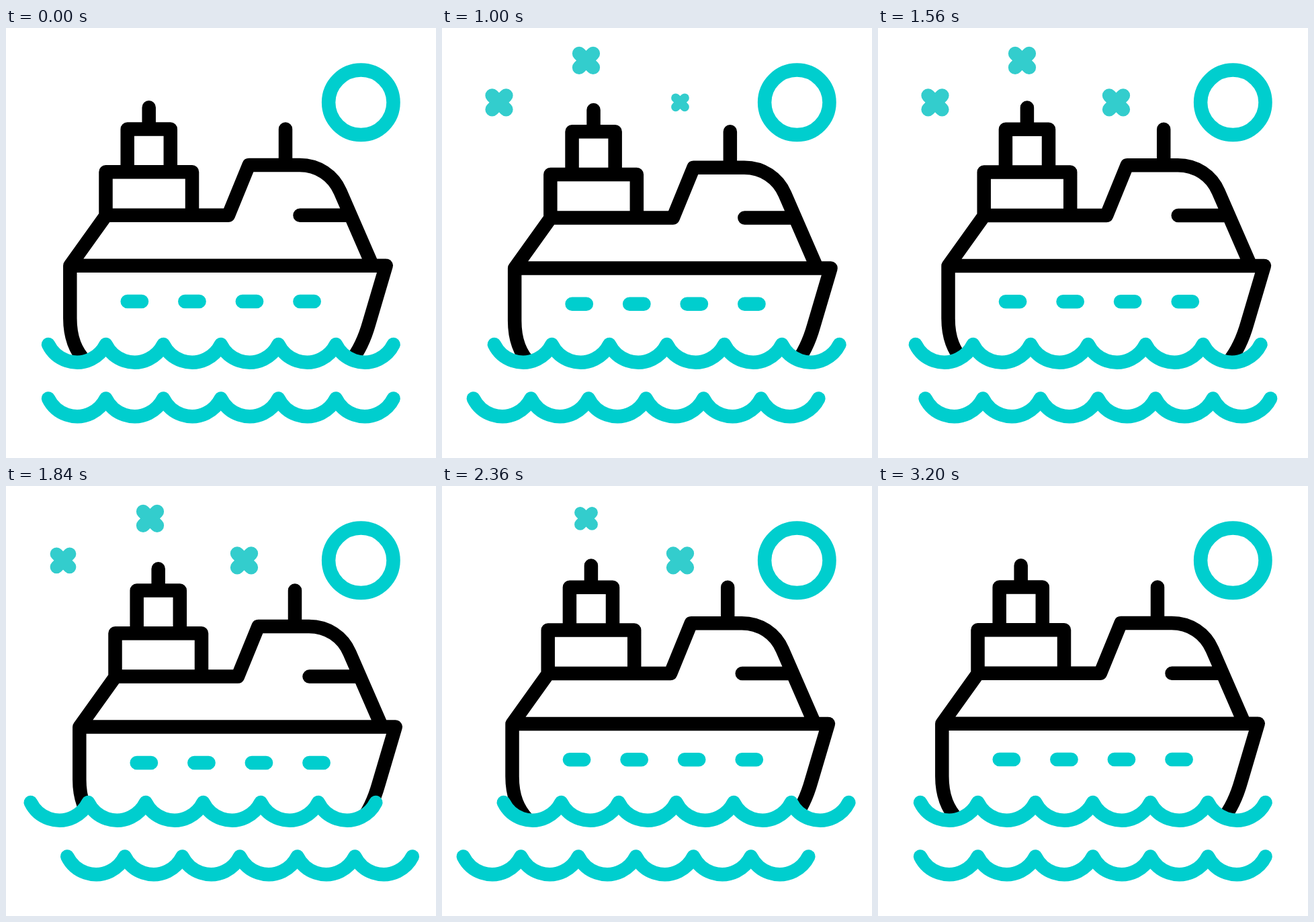
These frames come from a looping animation (640x640 px, 3.44 s). An HTML page with a canvas:

```html
<!DOCTYPE html>
<html lang="en">
<head>
<meta charset="utf-8">
<title>Ship at sea</title>
<style>
html, body { margin: 0; width: 100%; height: 100%; overflow: hidden; background: #fff; }
canvas { display: block; width: 640px; height: 640px; }
</style>
</head>
<body>
<canvas id="stage" width="640" height="640"></canvas>
<script>
const ctx = document.getElementById('stage').getContext('2d');
const LOOP = 3440, END = 3200, STEP = 40;
const TEAL = '#00cece', PALE = '#33cdcd', BLACK = '#000', LINE = 20.5;

// Keys are [time, value, ...]; each span eases in and out.
const WAVE_TOP = [[0, 0], [600, -27], [1200, 29.5], [1800, -27], [2400, 29.5], [3080, 0]];
const WAVE_LOW = [[0, 0], [600, 29], [1200, -32], [1800, 29], [2400, -32], [3080, 0]];
const SHIP = [[0, 0, 0], [400, 16.7, 6.9], [800, 9, 0], [1200, 16.7, 7.6], [1600, 9, 0],
  [2000, 16.7, 7.6], [2400, 9, 0], [2800, 16.7, 7.6], [3200, 0, 0]];
const STARS = [
  { x: 85, y: 110.8, show: 0, hide: 1780 },
  { x: 214.5, y: 48.4, show: 480, hide: 2260 },
  { x: 354.5, y: 110.8, show: 760, hide: 2580 }
];

const SHIP_LINES = new Path2D(
  'M95.3 353.7H565.7' +
  'M95.3 353.7V432C95.3 462 104 481 118 496' +
  'M565.7 353.7L540.5 439C534 462 526 480 513 496' +
  'M95.3 353.7L149 278.7H331L361.5 204H437C464 204 487 219 497.5 243.5L544.5 351.5' +
  'M437.5 278.7H511' +
  'M148.5 278.7V214.3H277V278.7' +
  'M180.7 214.3V150.5H244.8V214.3' +
  'M212.7 118.3V150.5' +
  'M416 150.5V204');
const WINDOWS = new Path2D('M180.7 407H202M266.3 407H287.6M351.8 407H373.1M437.4 407H458.7');

const SPAN = 85.6, RADIUS = 47.7;
const HALF = Math.asin(SPAN / 2 / RADIUS);

function ease(u) {
  u = Math.min(1, Math.max(0, u));
  return u * u * (3 - 2 * u);
}

function at(keys, t, col = 1) {
  for (let i = 1; i < keys.length; i++) {
    const a = keys[i - 1], b = keys[i];
    if (t <= b[0]) return a[col] + (b[col] - a[col]) * ease((t - a[0]) / (b[0] - a[0]));
  }
  return keys[keys.length - 1][col];
}

function wavePath(x, y) {
  const cy = y - RADIUS * Math.cos(HALF);
  for (let i = 0; i < 6; i++) {
    ctx.arc(x + SPAN * (i + 0.5), cy, RADIUS, Math.PI / 2 + HALF, Math.PI / 2 - HALF, true);
  }
}

function drawWave(x, y) {
  ctx.beginPath();
  wavePath(x, y);
  ctx.strokeStyle = TEAL;
  ctx.stroke();
}

function hideBelow(x, y) {
  ctx.beginPath();
  ctx.moveTo(x - 40, y);
  wavePath(x, y);
  ctx.lineTo(x + SPAN * 6 + 40, y);
  ctx.lineTo(x + SPAN * 6 + 40, y + 60);
  ctx.lineTo(x - 40, y + 60);
  ctx.fillStyle = '#fff';
  ctx.fill();
}

function drawStar(star, t) {
  const size = ease((t - star.show) / 400) - ease((t - star.hide) / 400);
  if (size < 0.002) return;
  const arm = 10.4;
  ctx.save();
  ctx.translate(star.x, star.y);
  ctx.scale(size, size);
  ctx.beginPath();
  ctx.moveTo(-arm, -arm);
  ctx.lineTo(arm, arm);
  ctx.moveTo(arm, -arm);
  ctx.lineTo(-arm, arm);
  ctx.strokeStyle = PALE;
  ctx.stroke();
  ctx.restore();
}

function drawShip(x, y) {
  ctx.save();
  ctx.translate(x, y);
  ctx.strokeStyle = BLACK;
  ctx.stroke(SHIP_LINES);
  ctx.strokeStyle = TEAL;
  ctx.stroke(WINDOWS);
  ctx.restore();
}

function draw(t) {
  ctx.fillStyle = '#fff';
  ctx.fillRect(0, 0, 640, 640);
  ctx.lineWidth = LINE;
  ctx.lineCap = ctx.lineJoin = 'round';

  ctx.beginPath();
  ctx.arc(528.3, 110.8, 48.2, 0, Math.PI * 2);
  ctx.strokeStyle = TEAL;
  ctx.stroke();

  STARS.forEach(star => drawStar(star, t));
  drawShip(at(SHIP, t), at(SHIP, t, 2));

  const topX = 63 + at(WAVE_TOP, t);
  hideBelow(topX, 471);
  drawWave(topX, 471);
  drawWave(63 + at(WAVE_LOW, t), 551.5);
}

const start = performance.now();
function tick() {
  const t = (performance.now() - start) % LOOP;
  draw(Math.min(END, Math.floor(t / STEP) * STEP));
  requestAnimationFrame(tick);
}
tick();
</script>
</body>
</html>
```
